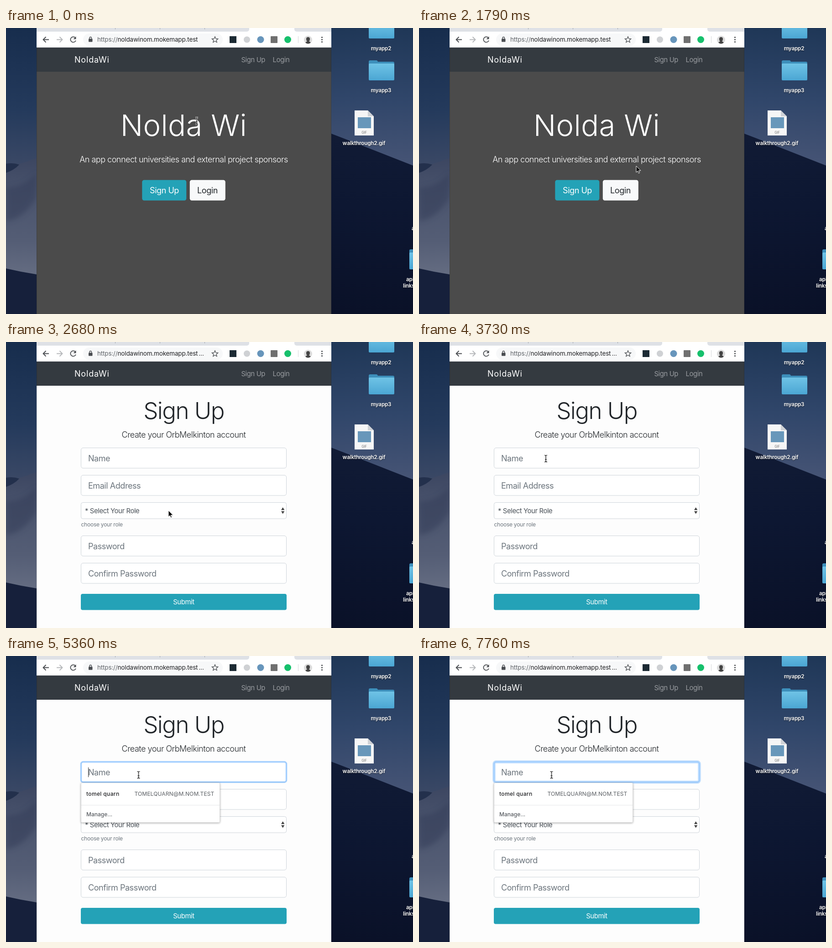
Animation, 892 px wide and 628 px high, one loop 8 s. Source, as an HTML page:

```html
<!DOCTYPE html>
<html lang="en">
<head>
<meta charset="utf-8">
<title>Sign up walkthrough</title>
<style>
html, body { margin: 0; width: 100%; height: 100%; overflow: hidden; background: #0c1530; }
svg { display: block; width: 100%; height: 100%; }
text { font-family: Inter, Roboto, sans-serif; font-optical-sizing: none; letter-spacing: -.025em; white-space: pre; }
.mid { text-anchor: middle; }
.lead { font-size: 18px; font-weight: 300; text-anchor: middle; letter-spacing: -.028em; }
.big { font-size: 18px; }
.body { font-size: 14.8px; }
.small { font-size: 12px; letter-spacing: -.02em; }
.url { font-size: 13.5px; letter-spacing: -.012em; }
.file { font-size: 11.7px; font-weight: 600; fill: #fff; letter-spacing: -.015em; text-shadow: 0 1px 2px #000a; }
.field { fill: #fff; stroke: #ced4da; }
.hint { fill: #6c757d; font-size: 18px; }
.icon { fill: none; stroke: #4a4d51; stroke-width: 1.8; }

/* Everything moves in hard steps on one 8 s clock. */
.step { animation: 8s step-end infinite; }
.welcome { animation-name: welcome; }
.signup { animation-name: signup; }
.press { animation-name: press; }
.focus { animation-name: focus; }
.popup { animation-name: popup; }
.caret { animation-name: caret; }
.cursor { animation-name: cursor; }
.arrow { animation-name: arrow; }
.ibeam { animation-name: ibeam; }
.hand { animation-name: hand; }

@keyframes welcome { 0% { opacity: 1 } 33.4%, 100% { opacity: 0 } }
@keyframes signup { 0% { opacity: 0 } 33.4%, 100% { opacity: 1 } }
@keyframes press {
  0% { fill: #24a2b7; stroke: none }
  29.65% { fill: #1b8698; stroke: none }
  31.53%, 100% { fill: #187d8f; stroke: #2a8999 }
}
@keyframes focus {
  0% { opacity: 0; stroke-width: 0 }
  66.9% { opacity: 1; stroke-width: 4px }
  68.8%, 100% { opacity: 1; stroke-width: 6.5px }
}
@keyframes popup { 0% { opacity: 0 } 66.9%, 100% { opacity: 1 } }
@keyframes caret {
  0% { opacity: 0 } 66.9% { opacity: 1 } 72.53% { opacity: 0 } 78.15% { opacity: 1 }
  85.65% { opacity: 0 } 91.28% { opacity: 1 } 96.9%, 100% { opacity: 0 }
}
@keyframes cursor {
  0% { transform: translate(418px, 204px) }
  9.15% { transform: translate(425px, 216px) }
  11.03% { transform: translate(445px, 254px) }
  12.9% { transform: translate(464px, 291px) }
  14.78% { transform: translate(472px, 321px) }
  18.53% { transform: translate(475px, 302px) }
  22.28% { transform: translate(476px, 303px) }
  24.15% { transform: translate(434px, 303px) }
  26.03% { transform: translate(374px, 310px) }
  27.9% { transform: translate(357px, 325px) }
  29.65% { transform: translate(357px, 366px) }
  31.53% { transform: translate(357px, 371px) }
  33.4% { transform: translate(356px, 370px) }
  39.03% { transform: translate(356px, 365px) }
  40.9% { transform: translate(355px, 357px) }
  44.65% { transform: translate(309px, 286px) }
  46.53% { transform: translate(278px, 256px) }
  48.4% { transform: translate(279px, 258px) }
  50.28% { transform: translate(280px, 261px) }
  52.03% { transform: translate(282px, 263px) }
  53.9% { transform: translate(283px, 264px) }
  57.65% { transform: translate(287px, 262px) }
  59.4%, 100% { transform: translate(290.5px, 261px) }
}
@keyframes arrow {
  0% { opacity: 0 } 11.03% { opacity: 1 } 12.9% { opacity: 0 } 14.78% { opacity: 1 }
  29.65% { opacity: 0 } 33.4% { opacity: 1 } 44.65%, 100% { opacity: 0 }
}
@keyframes ibeam {
  0% { opacity: 1 } 11.03% { opacity: 0 } 12.9% { opacity: 1 } 14.78% { opacity: 0 }
  44.65%, 100% { opacity: 1 }
}
@keyframes hand { 0% { opacity: 0 } 29.65% { opacity: 1 } 33.4%, 100% { opacity: 0 } }
</style>
</head>
<body>
<svg viewBox="0 0 892 628" preserveAspectRatio="none">
  <defs>
    <linearGradient id="sky" x2="0" y2="1">
      <stop stop-color="#1f3757"/><stop offset=".25" stop-color="#30466a"/><stop offset=".48" stop-color="#465475"/>
    </linearGradient>
    <linearGradient id="leftSky" x2="0" y2="1">
      <stop stop-color="#172d4d"/><stop offset=".6" stop-color="#243a5c"/><stop offset="1" stop-color="#3a4865"/>
    </linearGradient>
    <linearGradient id="dune" x2="0" y2="1">
      <stop stop-color="#3c4661"/><stop offset=".3" stop-color="#4a546d"/>
      <stop offset=".7" stop-color="#545d75"/><stop offset="1" stop-color="#656d82"/>
    </linearGradient>
    <linearGradient id="shade" x2="0" y2="1">
      <stop stop-color="#111b35"/><stop offset=".4" stop-color="#0d1732"/><stop offset="1" stop-color="#0a1128"/>
    </linearGradient>
    <linearGradient id="blue" x2="0" y2="1">
      <stop stop-color="#6fc3e6"/><stop offset="1" stop-color="#4ba6d3"/>
    </linearGradient>
    <filter id="soft" x="-10%" y="-10%" width="120%" height="130%">
      <feDropShadow dx="0" dy="1" stdDeviation="2" flood-opacity=".35"/>
    </filter>
    <filter id="blur"><feGaussianBlur stdDeviation="6"/></filter>
    <g id="folder">
      <path d="M0 3Q0 0 3 0H17Q19 0 20 3H53Q56 3 56 6V20H0Z" fill="#3d8fbb"/>
      <rect y="7" width="56" height="37" rx="2" fill="url(#blue)"/>
    </g>
    <path id="beam" fill="none" d="M-3-7.5Q0-7.5 0-5.5Q0-7.5 3-7.5M0-5.5V5.5M-3 7.5Q0 7.5 0 5.5Q0 7.5 3 7.5M-2 2H2"/>
  </defs>

  <!-- desktop -->
  <rect width="892" height="628" fill="url(#sky)"/>
  <rect width="67" height="300" fill="url(#leftSky)"/>
  <path d="M0 298Q14 296 28 299L67 286V545H0Z" fill="url(#dune)"/>
  <path d="M0 298Q16 295 29 300Q18 312 0 318Z" fill="#23304c"/>
  <path d="M0 350Q40 350 67 318V372Q38 420 0 424Z" fill="#303b56" opacity=".5" filter="url(#blur)"/>
  <path d="M0 528Q34 536 67 541V628H0Z" fill="#16203b"/>
  <path d="M713 232Q760 250 803 267T892 302V628H713Z" fill="url(#shade)"/>

  <use href="#folder" x="795" y="-21"/>
  <use href="#folder" x="795" y="71"/>
  <use href="#folder" x="884" y="486"/>
  <text class="file mid" x="822" y="49">myapp2</text>
  <text class="file mid" x="822" y="141">myapp3</text>
  <path d="M764 181H793L806 194V236H764Z" fill="#f6f6f6"/>
  <path d="M793 181V194H806Z" fill="#cfd2d6"/>
  <rect x="771" y="196" width="29" height="24" fill="#6897ba"/>
  <text class="mid" x="785" y="232" font-size="7.5" fill="#777">GIF</text>
  <text class="file mid" x="784.5" y="257">walkthrough2.gif</text>
  <text class="file" x="889" y="444">a</text>
  <text class="file" x="877" y="556">api</text>
  <text class="file" x="870" y="570">links</text>

  <!-- browser -->
  <rect x="67" width="646" height="628" fill="#fff"/>
  <path d="M67 0H533V3Q533 8 526 8H67ZM632 0V3Q632 8 639 8H713V0Z" fill="#dee1e6"/>
  <path d="M239.5 0V3M337.5 0V3M435.5 0V3" stroke="#a6a9ae"/>
  <rect x="169" y="12" width="306" height="27" rx="13.5" fill="#f7f8f9"/>
  <path class="icon" d="M94 25.5H82M87.5 19.5L81.5 25.5L87.5 31.5"/>
  <path class="icon" d="M111 25.5H123M117.5 19.5L123.5 25.5L117.5 31.5" style="stroke:#b5b7ba"/>
  <path class="icon" d="M152 21.5A6 6 0 1 0 153 27.5"/>
  <path d="M153.5 18.5V24.5H147.5Z" fill="#4a4d51"/>
  <rect x="181" y="23.5" width="8.5" height="7" rx="1" fill="#4a4d51"/>
  <path class="icon" d="M183 24V22A2.25 2.25 0 0 1 187.5 22V24" style="stroke-width:1.3"/>
  <text class="url" x="200" y="30" fill="#5f6368">https://<tspan fill="#202124">noldawinom.mokemapp.test</tspan></text>
  <text class="url step signup" x="422.5" y="30" fill="#202124">...</text>
  <path class="icon" style="stroke-width:1.3" d="M458 19L459.9 23.4 464.6 23.8 461 26.9 462.1 31.5 458 29 453.9 31.5 455 26.9 451.4 23.8 456.1 23.4Z"/>
  <rect x="490" y="18" width="15" height="15" fill="#1c2a33"/>
  <circle cx="528" cy="25.5" r="7" fill="#cfd1d4"/>
  <circle cx="558" cy="25.5" r="7.5" fill="#6795bb"/>
  <rect x="580" y="18" width="15" height="15" rx="1" fill="#707070"/>
  <circle cx="617.5" cy="25.5" r="7.5" fill="#16c06c"/>
  <path d="M640.5 18V33" stroke="#d5d7da"/>
  <circle cx="662" cy="26" r="9" fill="#dcdcdc"/>
  <path d="M658 24A4 4 0 0 1 666 24Q666 28 664 29L668 32Q662 37 656 32L660 29Q658 28 658 24Z" fill="#444"/>
  <g fill="#4a4d51"><circle cx="692.5" cy="20.5" r="1.6"/><circle cx="692.5" cy="25.5" r="1.6"/><circle cx="692.5" cy="30.5" r="1.6"/></g>

  <rect x="67" y="42" width="646" height="1" fill="#d4d6d9"/>
  <rect x="67" y="43" width="646" height="53" fill="#343a40"/>
  <text class="big" x="150" y="76" fill="#fff" style="letter-spacing:.045em">NoldaWi</text>
  <text class="body" x="515.5" y="75" fill="#999ca0">Sign Up</text>
  <text class="body" x="584.5" y="75" fill="#999ca0">Login</text>

  <g class="step welcome">
    <rect x="67" y="96" width="646" height="532" fill="#4b4b4b"/>
    <text class="mid" x="389.5" y="237" font-size="65" font-weight="300" fill="#fff" style="letter-spacing:.006em">Nolda Wi</text>
    <text class="lead" x="389.5" y="295" fill="#fff">An app connect universities and external project sponsors</text>
    <rect class="step press" x="298.3" y="333.7" width="97" height="45" rx="4.5" stroke-width="1.5"/>
    <text class="big mid" x="347" y="363" fill="#fff">Sign Up</text>
    <rect x="402.8" y="333.7" width="78" height="45" rx="4.5" fill="#f8f9fa"/>
    <text class="big mid" x="441.5" y="363" fill="#212529">Login</text>
  </g>

  <g class="step signup">
    <rect x="67" y="96" width="646" height="532" fill="#fdfdfd"/>
    <text class="mid" x="389.5" y="169" font-size="51" font-weight="300" fill="#212529" style="letter-spacing:-.03em">Sign Up</text>
    <text class="lead" x="389.5" y="210" fill="#212529">Create your OrbMelkinton account</text>
    <g class="field">
      <rect x="164.5" y="232.5" width="450" height="44.5" rx="4.5"/>
      <rect x="164.5" y="292.5" width="450" height="44.5" rx="4.5"/>
      <rect x="164.5" y="352.5" width="450" height="35.5" rx="4"/>
      <rect x="164.5" y="425.5" width="450" height="44.5" rx="4.5"/>
      <rect x="164.5" y="485.5" width="450" height="44.5" rx="4.5"/>
    </g>
    <g class="step focus" fill="none">
      <rect x="164.5" y="232.5" width="450" height="44.5" rx="4.5" stroke="#007bff" stroke-opacity=".25"/>
      <rect x="164.5" y="232.5" width="450" height="44.5" rx="4.5" stroke="#80bdff" stroke-width="1"/>
    </g>
    <text class="hint" x="180" y="262">Name</text>
    <text class="hint" x="180" y="322">Email Address</text>
    <text class="body" x="173" y="376" fill="#495057">* Select Your Role</text>
    <path d="M603 369L606.7 363 610.4 369ZM603 371.5L606.7 377.5 610.4 371.5Z" fill="#444"/>
    <text class="small" x="164.5" y="405" fill="#6c757d">choose your role</text>
    <text class="hint" x="180" y="455">Password</text>
    <text class="hint" x="180" y="515">Confirm Password</text>
    <rect x="164" y="553" width="451" height="35.5" rx="4" fill="#24a2b7"/>
    <text class="body mid" x="389.5" y="576" fill="#fff">Submit</text>

    <path class="step caret" d="M180.5 244.5V266" stroke="#333"/>
    <g class="step popup">
      <rect x="164.5" y="278.5" width="304" height="87" rx="2" fill="#fff" stroke="#c9c9c9" stroke-width=".6" filter="url(#soft)"/>
      <path d="M165 327.5H468" stroke="#e6e7e9"/>
      <text class="small" x="176" y="307" font-weight="500" fill="#202124" style="letter-spacing:.03em">tomel quarn</text>
      <text class="small" x="281.5" y="307" fill="#5a5e63" style="letter-spacing:.01em">TOMELQUARN@M.NOM.TEST</text>
      <text class="small" x="176" y="352" font-weight="500" fill="#5a5e63" style="letter-spacing:0">Manage...</text>
    </g>
  </g>
  <path d="M67.5 43V628M712.5 43V628" stroke="#000" stroke-opacity=".15"/>

  <!-- pointer -->
  <g class="step cursor" stroke-linejoin="round">
    <path class="step arrow" d="M0 0V14L3.2 11 5.4 16 7.6 15 5.4 10.2H10Z" stroke="#fff"/>
    <g class="step ibeam">
      <use href="#beam" stroke="#fff" stroke-width="2.8"/>
      <use href="#beam" stroke="#000" stroke-width="1.2"/>
    </g>
    <path class="step hand" d="M-1.3 1A1.3 1.3 0 0 1 1.3 1V5.2L2.3 4.8 3.7 5.6 4.9 5.5 6 6.5 7.3 7V10.5L6 14.5H0L-4.5 8.5C-5 7-3.5 6.5-2.6 7.4L-1.3 9Z" fill="#fff" stroke="#000"/>
  </g>
</svg>
</body>
</html>
```
